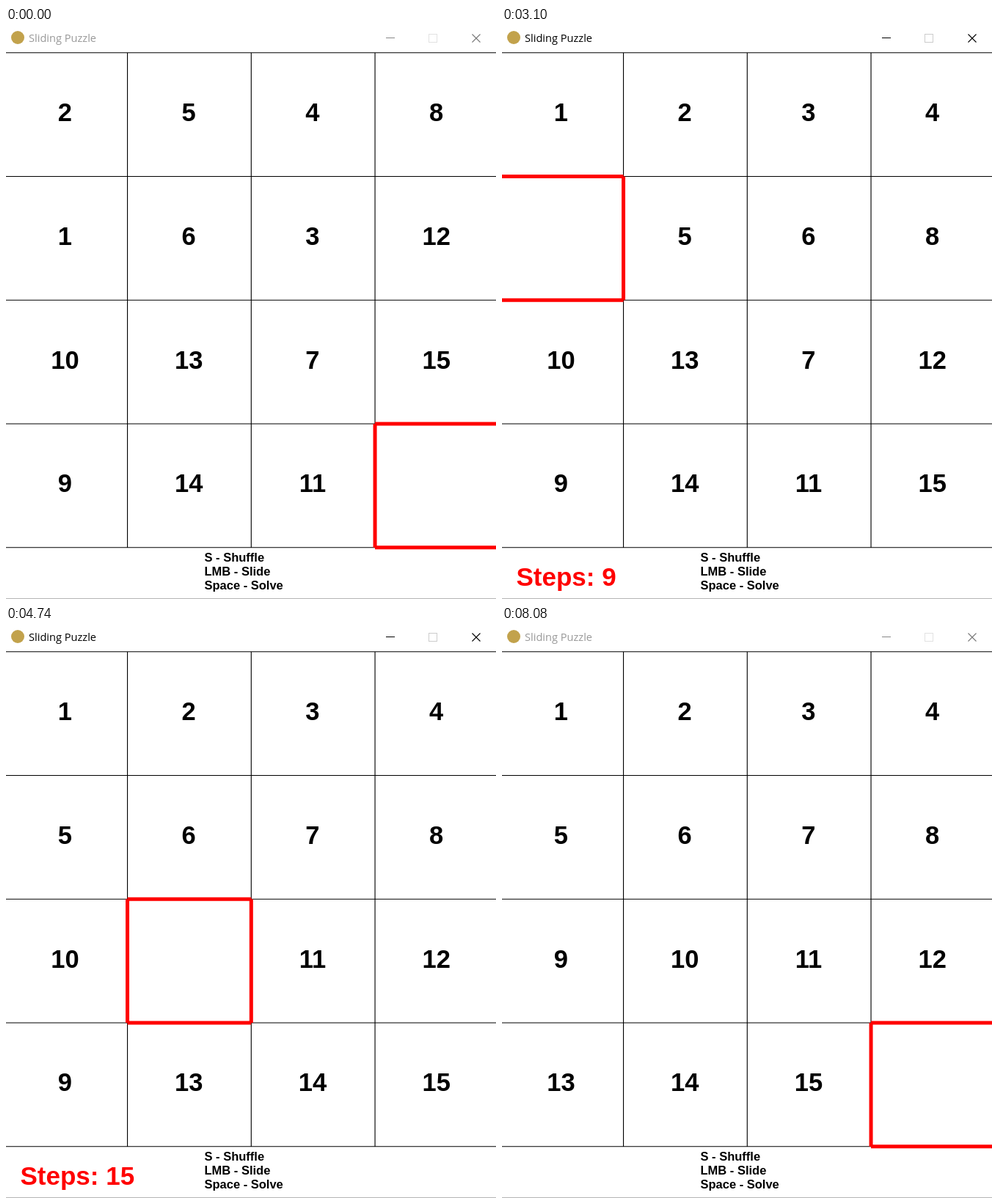
An HTML page for the animation above (8160 ms loop, 668 by 779 pixels).

```html
<!DOCTYPE html>
<html lang="en">
<head>
<meta charset="utf-8">
<title>Sliding Puzzle</title>
<style>
  html, body { margin: 0; width: 100%; height: 100%; overflow: hidden; background: #fff; }
  svg { display: block; width: 668px; height: 779px; }
  text { font-family: "Liberation Sans", Arial, sans-serif; font-weight: bold; }
  #title { font: 14.6px "Open Sans", "Noto Sans", sans-serif; }
  #tiles { font-size: 34.5px; text-anchor: middle; }
  #steps { font-size: 35px; fill: #f00; }
  #help { font-size: 16.5px; }
  .crisp { shape-rendering: crispEdges; }
</style>
</head>
<body>
<svg viewBox="0 0 668 779">
  <defs><clipPath id="client"><rect y="33" width="668" height="746"/></clipPath></defs>
  <circle cx="16" cy="13" r="9" fill="#c2a24c"/>
  <text id="title" x="31" y="19">Sliding Puzzle</text>
  <g fill="none">
    <path id="minimize" class="crisp" d="M518 13.5H530"/>
    <rect id="maximize" class="crisp" x="576.5" y="8.5" width="11" height="11"/>
    <path id="close" d="M635.5 8.5L646.5 19.5M646.5 8.5L635.5 19.5" stroke-width="1.1"/>
  </g>
  <path id="grid" stroke="#000" stroke-width="1.125"/>
  <g id="tiles"></g>
  <g clip-path="url(#client)">
    <path id="blank" fill="none" stroke="#f00" stroke-width="5"/>
  </g>
  <text id="steps" x="19.5" y="761"></text>
  <g id="help">
    <text x="270.5" y="728">S - Shuffle</text>
    <text x="270.5" y="747">LMB - Slide</text>
    <text x="270.5" y="766">Space - Solve</text>
  </g>
  <path class="crisp" d="M0 778.5H668" stroke="#b4b4b4"/>
</svg>
<script>
const LOOP = 8160, FOCUS = 600, BLUR = 8080, STEPS_END = 6290;
const START = [2, 5, 4, 8, 1, 6, 3, 12, 10, 13, 7, 15, 9, 14, 11, 0];
const MOVES = "UUULDLULDRRDDLULDRRR";
const MOVE_TIMES = [1000, 1230, 1550, 1780, 2100, 2330, 2620, 2880, 3100, 3400,
  3630, 3940, 4180, 4490, 4740, 4970, 5220, 5520, 5750, 6060];
const OFFSET = { U: -4, D: 4, L: -1, R: 1 };
const CELL = 168.75;

const $ = id => document.getElementById(id);
const lineX = col => -3.2 + col * CELL;
const lineY = row => 33.8 + row * CELL;

// Every board position, indexed by the number of moves made
const boards = [START];
for (const move of MOVES) {
  const board = boards.at(-1).slice();
  const from = board.indexOf(0), to = from + OFFSET[move];
  [board[from], board[to]] = [board[to], 0];
  boards.push(board);
}

let grid = "";
for (let i = 0; i <= 4; i++) {
  grid += `M0 ${lineY(i)}H668M${lineX(i)} ${lineY(0)}V${lineY(4)}`;
}
$("grid").setAttribute("d", grid);

const labels = START.map((_, i) => {
  const label = document.createElementNS("http://www.w3.org/2000/svg", "text");
  label.setAttribute("x", 80.4 + (i % 4) * CELL);
  label.setAttribute("y", 127.2 + Math.floor(i / 4) * CELL);
  return $("tiles").appendChild(label);
});

function drawWindow(focused) {
  $("title").setAttribute("fill", focused ? "#000" : "#999");
  $("minimize").setAttribute("stroke", focused ? "#000" : "#888");
  $("maximize").setAttribute("stroke", focused ? "#ccc" : "#e2e2e2");
  $("close").setAttribute("stroke", focused ? "#000" : "#777");
}

function drawBoard(board) {
  board.forEach((n, i) => { labels[i].textContent = n || ""; });
  const hole = board.indexOf(0), col = hole % 4, row = Math.floor(hole / 4);
  const left = lineX(col), right = lineX(col + 1);
  const top = lineY(row), bottom = lineY(row + 1);
  // Four butt-ended strokes leave the corners notched
  $("blank").setAttribute("d",
    `M${left} ${top}H${right}M${left} ${bottom}H${right}` +
    `M${left} ${top}V${bottom}M${right} ${top}V${bottom}`);
}

let shown = "";
function render(time) {
  const focused = time >= FOCUS && time < BLUR;
  const count = MOVE_TIMES.filter(t => t <= time).length;
  const steps = count && time < STEPS_END ? `Steps: ${count}` : "";
  const state = [focused, count, steps].join();
  if (state === shown) return;
  shown = state;
  drawWindow(focused);
  drawBoard(boards[count]);
  $("steps").textContent = steps;
}

const began = performance.now();
function tick() {
  render((performance.now() - began) % LOOP);
  requestAnimationFrame(tick);
}
tick();
</script>
</body>
</html>
```
